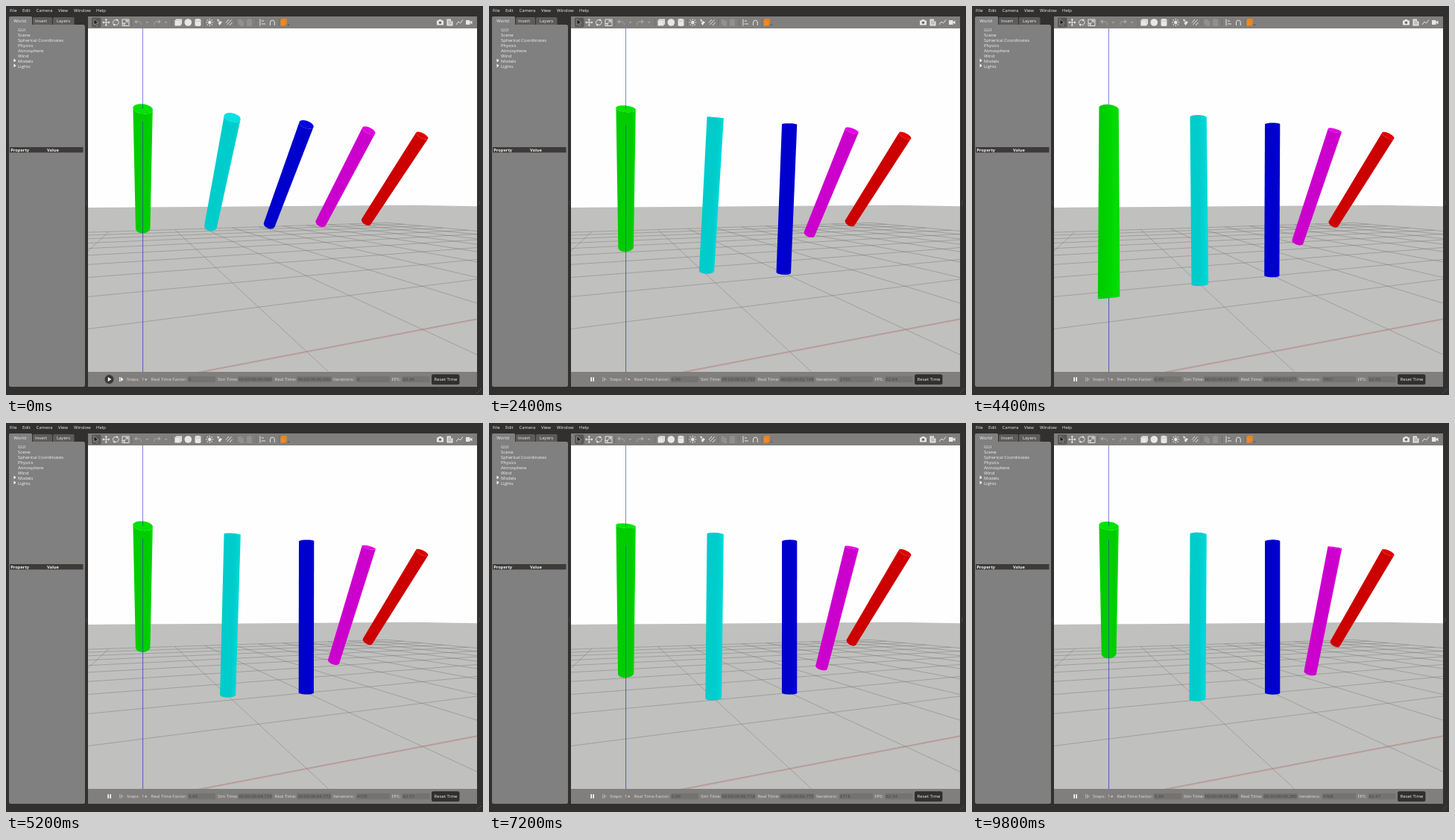
An HTML page that plays this animation: 640x521 px, repeating every 9900 ms.

```html
<!DOCTYPE html>
<html lang="en">
<head>
<meta charset="utf-8">
<title>Damped pendulums</title>
<style>
html, body { margin: 0; width: 100%; height: 100%; overflow: hidden; background: #31302e; }
svg { display: block; }
text { font: 6px "Open Sans", "Noto Sans", sans-serif; fill: #f0f0ee; white-space: pre; }
.bold { font-weight: 700; font-size: 5.7px; }
.mid { text-anchor: middle; }
.lab { fill: #dcdcda; }
.val { fill: #40403e; }
.icon { fill: none; stroke: #e6e6e4; stroke-width: 1; }
.dim { opacity: .35; }
</style>
</head>
<body>
<svg id="stage" width="100%" height="100%" viewBox="0 0 640 521">
  <defs id="defs"></defs>
  <rect width="640" height="521" fill="#31302e"/>
  <svg x="110" y="30" width="522" height="460" viewBox="110 30 522 460">
    <rect x="110" y="30" width="522" height="460" fill="#fefefe"/>
    <g id="scene"></g>
  </svg>
  <g id="chrome"></g>
</svg>
<script>
const NS = "http://www.w3.org/2000/svg";
const $ = id => document.getElementById(id);
function set(el, attrs) {
  for (const k in attrs) el.setAttribute(k, attrs[k]);
  return el;
}
function add(parent, tag, attrs, text) {
  const el = set(document.createElementNS(NS, tag), attrs);
  if (text !== undefined) el.textContent = text;
  parent.appendChild(el);
  return el;
}
const scene = $("scene"), chrome = $("chrome");

// Camera at the origin, turned 22.5 degrees; points are [right, away, up] in metres.
const C = Math.cos(Math.PI / 8), S = Math.sin(Math.PI / 8), F = 452;
const depth = p => p[1] * C + p[0] * S;
function project(p) {
  const z = depth(p);
  return [371 + F * (p[0] * C - p[1] * S) / z, 260 - F * p[2] / z];
}
const pts = list => list.map(p => project(p).map(v => v.toFixed(2)).join()).join(" ");
const dot = (a, b) => a.reduce((sum, v, i) => sum + v * b[i], 0);
const mix = (p, q, k) => p.map((v, i) => v + (q[i] - v) * k);

// Ground
const GROUND = -2, NEAR = 0.4;
add(scene, "polygon", { points: "110,270 548,266.7 632,268.3 632,490 110,490", fill: "#c0c0be" });
function floorLine(p, q, stroke, width, dy = 0) {
  const zp = depth(p), zq = depth(q);
  if (zp < NEAR && zq < NEAR) return;
  if (zp < NEAR) p = mix(p, q, (NEAR - zp) / (zq - zp));
  else if (zq < NEAR) q = mix(q, p, (NEAR - zq) / (zp - zq));
  add(scene, "polyline", { points: pts([p, q]), fill: "none", stroke,
    "stroke-width": width, transform: `translate(0 ${dy})` });
}
for (let i = -20; i <= 20; i += 2) {
  floorLine([-20, 4 + i, GROUND], [20, 4 + i, GROUND], "#70706e", 0.42);
  floorLine([i, -16, GROUND], [i, 24, GROUND], "#70706e", 0.42);
}
floorLine([-20, 4, GROUND], [20, 4, GROUND], "#d86a66", 0.5, 1);

// Pendulums
const AXIS = { fill: "none", stroke: "#3030c8", "stroke-width": 0.7, "stroke-opacity": 0.85 };
const AXIS_X = 183.5, PIVOT_Y = project([0, 4, 1])[1];
add(scene, "path", { d: `M${AXIS_X} 30V490`, ...AXIS });

const LEN = 2, RAD = 0.1, SIDES = 48, STOPS = 8, STEP = 100, FRAMES = 99;
const LIGHT = [0.5, -0.1, 0.9].map(v => v / Math.hypot(0.5, 0.1, 0.9));
const INERTIA = 1.3358, PULL = 7.207, START = 245;

// Angle at every display step; positive swings towards the viewer.
function swing(damping) {
  const c = damping / INERTIA, dt = 0.001, out = [];
  let a = -Math.PI / 4, w = 0;
  for (let ms = 0; ms < FRAMES * STEP; ms++) {
    if (ms % STEP === 0) out.push(ms < 300 ? -Math.PI / 4 : a);
    if (ms < START) continue;
    w = (w - PULL * Math.sin(a) * dt) / (1 + c * dt);
    a += w * dt;
  }
  return out;
}
const rods = [
  { damping: 0, rgb: [0, 1, 0] },
  { damping: 1, rgb: [0, 1, 1] },
  { damping: 10, rgb: [0, 0, 1] },
  { damping: 100, rgb: [1, 0, 1] },
  { damping: 1000, rgb: [1, 0, 0] }
].map((r, i) => {
  const shade = add($("defs"), "linearGradient", { id: "shade" + i, gradientUnits: "userSpaceOnUse" });
  return {
    ...r, x: i, angles: swing(r.damping), shade,
    stops: Array.from({ length: STOPS + 1 }, (_, k) => add(shade, "stop", { offset: k / STOPS })),
    body: add(scene, "polygon", { fill: `url(#shade${i})` }),
    caps: [add(scene, "polygon", {}), add(scene, "polygon", {})]
  };
});
const axisFront = add(scene, "path", AXIS);

function lit(normal, rgb) {
  const k = 255 * (0.8 + 0.12 * Math.max(0, dot(normal, LIGHT)));
  return `rgb(${rgb.map(v => Math.round(v * k)).join()})`;
}
function drawCap(el, ring, normal, rgb) {
  const mid = mix(ring[0], ring[SIDES / 2], 0.5);
  set(el, { points: dot(normal, mid) < 0 ? pts(ring) : "", fill: lit(normal, rgb) });
}
function drawRod(rod, n) {
  const a = rod.angles[n], s = Math.sin(a), c = Math.cos(a);
  const down = [0, -s, -c];
  const normal = t => [Math.cos(t), -c * Math.sin(t), s * Math.sin(t)];
  const angle = k => (k / SIDES - 0.25) * 2 * Math.PI;
  const point = (t, along) =>
    normal(t).map((v, i) => [rod.x, 4, 1][i] + RAD * v + along * down[i]);
  const top = [], bottom = [], seen = [];
  for (let k = 0; k < SIDES; k++) {
    const t = angle(k);
    top.push(point(t, 0));
    bottom.push(point(t, LEN));
    if (dot(normal(t), top[k]) < 0) seen.push(k);
  }
  set(rod.body, { points: pts([...seen.map(k => top[k]), ...seen.reverse().map(k => bottom[k])]) });

  // Shade across the visible side, at right angles to the rod
  const left = angle(seen[0]), right = angle(seen[seen.length - 1]);
  const p = project(point(left, LEN / 2)), q = project(point(right, LEN / 2));
  const u = project([rod.x, 4, 1]), v = project([0, 1, 2].map(i => [rod.x, 4, 1][i] + LEN * down[i]));
  const len = Math.hypot(v[0] - u[0], v[1] - u[1]);
  const across = [(v[1] - u[1]) / len, (u[0] - v[0]) / len];
  const width = dot([q[0] - p[0], q[1] - p[1]], across);
  set(rod.shade, { x1: p[0], y1: p[1], x2: p[0] + across[0] * width, y2: p[1] + across[1] * width });
  rod.stops.forEach((stop, k) => {
    const t = (left + right) / 2 + Math.asin(k / STOPS * 2 - 1) * (right - left) / Math.PI;
    set(stop, { "stop-color": lit(normal(t), rod.rgb) });
  });
  drawCap(rod.caps[0], top, [0, s, c], rod.rgb);
  drawCap(rod.caps[1], bottom, down, rod.rgb);
}
// Parts of the vertical axis that pass in front of the first rod
function drawAxis(a) {
  const s = Math.sin(a), c = Math.cos(a);
  let d = "";
  if (a < 0) {
    const rim = project([0, 4 + RAD * c, 1 - RAD * s])[1];
    const foot = project([0, 4 - LEN * s - RAD * c, 1 - LEN * c + RAD * s])[1];
    const exit = project([0, 4, 1 + RAD / s])[1];
    if (Math.tan(-a) > 0.25) d += `M${AXIS_X} ${rim}V${PIVOT_Y}`;
    if (exit < foot) d += `M${AXIS_X} ${exit}V${foot}`;
  }
  set(axisFront, { d });
}

// Window
const box = (x, y, w, h, fill, more) =>
  add(chrome, "rect", { x, y, width: w, height: h, fill, ...more });
const label = (x, y, text, cls = "") => add(chrome, "text", { x, y, class: cls }, text);
const icon = (d, more = {}) => add(chrome, "path", { d, class: "icon", ...more });
const solid = (d, fill = "#e6e6e4", cls = "") => add(chrome, "path", { d, fill, class: cls });

[["File", 5], ["Edit", 22], ["Camera", 40.5], ["View", 70], ["Window", 91], ["Help", 121]]
  .forEach(([s, x]) => label(x, 7.5, s));

// Side panel
box(36, 15, 26, 11, "#5d5c5a", { rx: 1.5 });
box(63, 15, 28.5, 11, "#5d5c5a", { rx: 1.5 });
box(4, 25, 102, 485, "#808080", { rx: 2.5 });
box(4, 14, 31, 14, "#808080", { rx: 1.5 });
[["World", 18.5], ["Insert", 47], ["Layers", 77]].forEach(([s, x]) => label(x, 22.3, s, "mid"));
["GUI", "Scene", "Spherical Coordinates", "Physics", "Atmosphere", "Wind", "Models", "Lights"]
  .forEach((s, i) => label(16, 34 + i * 6.93, s));
solid("M10.5 70.5l3 2.4-3 2.4zM10.5 77.4l3 2.4-3 2.4z", "#fff");
box(5, 189, 98.5, 7.3, "#3c3b39");
label(6.3, 194.8, "Property", "bold");
label(55, 194.8, "Value", "bold");
for (const x of [107.5, 634.5])
  for (const y of [261, 263, 265]) box(x, y, 0.8, 0.8, "#777");

// Toolbar
box(110, 14, 522, 16, "#807f7d");
box(115, 15.5, 12.5, 13, "#5a5957", { rx: 1.5 });
add(chrome, "path", { d: "M118 17.5l6 5.2-2.7.3 1.5 3-1.4.6-1.4-3-2 1.8z",
  fill: "#1e1d1c", stroke: "#d8d8d6", "stroke-width": 0.5 });
icon("M134.3 18v8M130.3 22h8");
solid("M134.3 16.7l1.7 2.3h-3.4zM134.3 27.3l1.7-2.3h-3.4zM129 22l2.3-1.7v3.4zM139.6 22l-2.3-1.7v3.4z");
icon("M143.7 23.5a3.8 3.8 0 0 1 5.5-4.5M151 20.5a3.8 3.8 0 0 1-5.5 4.5");
solid("M148.5 17l2.8 2.2-3 1.3zM146 27l-2.8-2.2 3-1.3z");
icon("M156 18h9v8.5h-9zM157.5 25l5.5-5.5M160.5 19.5h2.7v2.7M156 23.3h3v3", { "stroke-width": 0.8 });
icon("M174 21h4a3 3 0 0 1 3 4.5", { class: "icon dim" });
solid("M172 21l3.5-3v6z", "#e6e6e4", "dim");
icon("M206 21h-4a3 3 0 0 0-3 4.5", { class: "icon dim" });
solid("M208 21l-3.5-3v6z", "#e6e6e4", "dim");
solid("M187.5 21h4l-2 2.5zM212.5 21h4l-2 2.5z", "#e6e6e4", "dim");
for (const x of [168.5, 222, 266, 307.5, 335.5, 366])
  box(x, 17, 0.6, 10, "#666562");
solid("M226.5 19.5l2-2h7.5v6.5l-2 2.5h-7.5z", "#e8e8e6");
icon("M226.5 19.5h7.5v7M234 19.5l2-2", { style: "stroke:#bbb;stroke-width:.6" });
add(chrome, "circle", { cx: 244.3, cy: 22, r: 4.8, fill: "#e8e8e6" });
solid("M253.5 18.5a4 1.6 0 0 1 8 0v7a4 1.6 0 0 1-8 0z", "#e8e8e6");
icon("M253.5 18.7a4 1.6 0 0 0 8 0", { style: "stroke:#aaa;stroke-width:.6" });
add(chrome, "circle", { cx: 273.3, cy: 22, r: 2.2, fill: "#e6e6e4" });
for (let i = 0; i < 8; i++)
  icon("M273.3 18.8v-1.8", { transform: `rotate(${i * 45} 273.3 22)`, "stroke-width": 0.8 });
solid("M283 17.5l3.5 1.2-2 2.8zM287 20l3 1.5-3.5 4.5-1.8-3z");
icon("M295 22.5l4-4.5M296.5 25l6-6.5M300 26l3.5-4");
solid("M311.5 18h5v7h-5zM314 20h5v7h-5z", "#b4b3b0", "dim");
solid("M323 18h7v9h-7zM325 17h3v2h-3z", "#b4b3b0", "dim");
icon("M341 17.5v9M343 20h3M343 24h5", { "stroke-width": 1.5 });
icon("M354.5 26v-4a2.9 2.9 0 0 1 5.8 0v4", { "stroke-width": 1.5 });
solid("M368.5 18.8l1.8-1.8h6.4v7l-1.8 2.4h-6.4z", "#f08a24");
icon("M368.5 18.8h6.4v7.6M374.9 18.8l1.8-1.8", { style: "stroke:#c8701a;stroke-width:.5" });
solid("M377.5 24.5h3l-1.5 2z", "#555");
solid("M578 19.5h2l1-1.5h3l1 1.5h2v6h-9z");
add(chrome, "circle", { cx: 582.5, cy: 22.3, r: 1.8, fill: "#6b6a68" });
solid("M591.5 17.5h5.5v3h2.5v6h-8z");
icon("M593 20h3M593 22h5M593 24h5", { style: "stroke:#777;stroke-width:.7" });
icon("M604 25l3-4 2.5 2 3.5-4.5");
solid("M617 19h5.5v6h-5.5zM622.5 21.5l3-2v5l-3-2z");

// Time bar
box(110, 490, 522, 20, "#807f7d");
const ring = add(chrome, "circle", { cx: 138.5, cy: 500, r: 6, fill: "#3a3937" });
const play = solid("M136.8 497l4.6 3-4.6 3z", "#fff");
const pause = solid("M136.4 497.2h1.6v5.6h-1.6zM139.4 497.2h1.6v5.6h-1.6z", "#fff");
const step = solid("M152 497h1.3v6h-1.3zM154 497l3.7 3-3.7 3z", "#f0f0ee");
label(162, 502.2, "Steps:", "lab");
label(182, 502.2, "1", "lab");
solid("M186 499.5h3.4l-1.7 2.2z", "#dcdcda");
function field(name, x, bx, w) {
  label(x, 502.2, name, "lab");
  box(bx, 496, w, 8, "#747371", { rx: 0.8 });
  return label(bx + 1, 502.2, "", "val");
}
const out = {
  factor: field("Real Time Factor:", 194.5, 244, 37),
  sim: field("Sim Time:", 284, 311.5, 46),
  real: field("Real Time:", 360.5, 390.5, 46),
  iter: field("Iterations:", 439, 470, 45),
  fps: field("FPS:", 517.5, 531.5, 37)
};
box(571.5, 493.8, 36.5, 12.8, "#31302e", { rx: 1.5, stroke: "#22211f", "stroke-width": 0.7 });
label(590, 502.2, "Reset Time", "mid");
for (let i = 0; i < 3; i++) box(636 - i * 2, 513 + i * 2, 1, 1, "#6a6967");

// time, simulated, lag of the simulation, frames per second
const marks = [
  [300, 60, 2, 62.46], [1400, 1156, 7, 62.78], [2400, 2153, 15, 62.64], [4400, 3931, 40, 62.5],
  [6000, 5526, 47, 62.56], [7200, 6718, 57, 62.54], [9800, 9308, 72, 62.47]
];
function reading(ms) {
  if (ms < 300) return [ms, 0, 0, 62.46];
  let i = 0;
  while (i < marks.length - 2 && ms >= marks[i + 1][0]) i++;
  const p = marks[i], q = marks[i + 1];
  return mix(p, q, (ms - p[0]) / (q[0] - p[0]));
}
const clock = ms => "00:00:00:" + (ms / 1000).toFixed(3).padStart(6, "0");
const show = (el, on) => set(el, { visibility: on ? "visible" : "hidden" });

function draw(n) {
  const ms = n * STEP, running = ms >= 300;
  rods.forEach(r => drawRod(r, n));
  drawAxis(rods[0].angles[n]);
  const [, sim, lag, fps] = reading(ms);
  out.factor.textContent = running ? "0.99" : "0";
  out.sim.textContent = clock(Math.round(sim));
  out.real.textContent = clock(Math.round(sim + lag));
  out.iter.textContent = Math.round(sim);
  out.fps.textContent = fps.toFixed(2);
  show(play, !running);
  show(pause, running);
  show(ring, ms < 1600);
  set(step, { opacity: running ? 0.35 : 1 });
}

let last = -1;
const begin = performance.now();
function tick() {
  const n = Math.floor((performance.now() - begin) / STEP) % FRAMES;
  if (n !== last) draw(last = n);
  requestAnimationFrame(tick);
}
tick();
</script>
</body>
</html>
```
